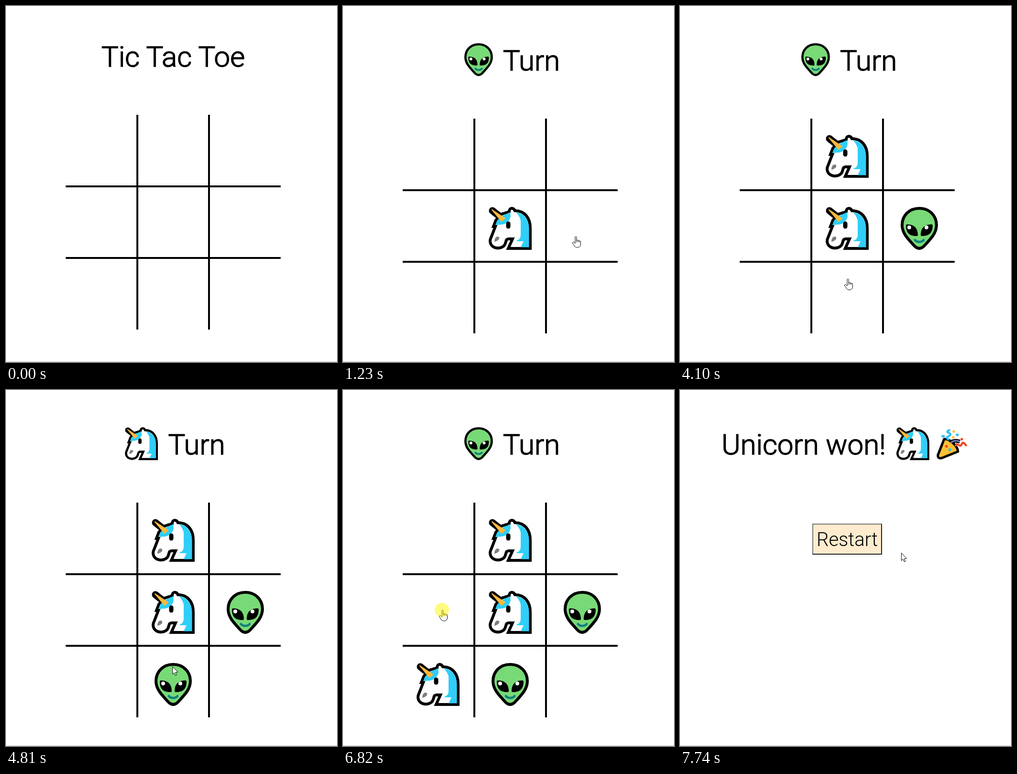
An HTML page for the animation above (8 s loop, 693 px wide and 746 px high).

```html
<!DOCTYPE html>
<html lang="en">
<head>
<meta charset="utf-8">
<title>Tic Tac Toe</title>
<style>
  html, body { margin: 0; width: 100%; height: 100%; overflow: hidden; background: #fff; }
  svg { display: block; }
  text { font: 300 60px Roboto, sans-serif; }
  .title { stroke: #000; stroke-width: 1.4; }
  .label { font-size: 40px; }
</style>
</head>
<body>
<svg width="693" height="746" viewBox="0 0 693 746">
  <defs>
    <g id="unicorn">
      <path d="M8 8 28 24" stroke="#000" stroke-width="15" stroke-linecap="round"/>
      <path d="M43 10C43 1 52 1 55 8C76 8 87 24 87 44V87H41L50 67H42C36 67 37 71 35 76C31 91 3 90 3 71C3 68 4 66 5 64L14 41H10L15 28L27 15Z"
        fill="#fff" stroke="#000" stroke-width="6"/>
      <path d="M57 11C75 13 84.500 28 84.500 45V84.500H67L73 72H57C64 68 67 66 67 58V28Q64 18 57 11Z" fill="#30cef8"/>
      <path d="M45 11 46 20C43 31 36 36 27 37L14 38 18 28 30 18Z" fill="#30cef8"/>
      <path d="M7 6 34 24 27 30Z" fill="#fbb93c" stroke="#fbb93c" stroke-width="2" stroke-linejoin="round"/>
      <rect x="36.500" y="30.500" width="9" height="15" rx="4.500"/>
      <path d="M12 73C12 66 15 62 19 62C25 63 23 71 12 73Z" fill="#7c8083"/>
    </g>
    <g id="alien">
      <path d="M39 3C60 3 75 18 75 38C75 54 65 65 48 83Q39 91 30 83C13 65 3 54 3 38C3 18 18 3 39 3Z"
        fill="#78da76" stroke="#000" stroke-width="6"/>
      <path id="eye" d="M11 39Q11 36 14 36.500C28 37 36 44 36 59Q36 61 33 61C18 61 11 54 11 39Z"/>
      <use href="#eye" transform="matrix(-1 0 0 1 78 0)"/>
      <g fill="#fff"><circle cx="18" cy="43" r="4"/><circle cx="54" cy="43" r="4"/></g>
      <path d="M30 69.500C34 74.500 44 74.500 48 69.500" fill="none" stroke="#138080" stroke-width="5" stroke-linecap="round"/>
    </g>
    <g id="popper" fill="none">
      <g stroke="#000" stroke-width="11" stroke-linecap="round" stroke-linejoin="round">
        <use href="#cyan"/><use href="#red"/><use href="#dots"/>
      </g>
      <path d="M17 25 4 58Q3 66 11 65L46 51C46 40 28 23 17 25Z" fill="#fdbf35" stroke="#000" stroke-width="5" stroke-linejoin="round"/>
      <path d="M31 33Q36 26 50 30" stroke="#000" stroke-width="8"/>
      <path d="M31 33Q36 26 50 30" stroke="#6f7bb5" stroke-width="3.500"/>
      <path id="cyan" d="M28 6Q20 9 27 12T26 19 28 26" stroke="#30bff0" stroke-width="4"/>
      <path id="red" d="M41 40Q42 33 47 37T54 35 63 38" stroke="#f04a24" stroke-width="4"/>
      <g id="dots">
        <path d="M14 19h2M44 16h1" stroke="#30bff0" stroke-width="5" stroke-linecap="round"/>
        <path d="M37 9h.1M36 21h.1" stroke="#fdbf35" stroke-width="5" stroke-linecap="round"/>
        <path d="M54 25h.1" stroke="#f04a24" stroke-width="5" stroke-linecap="round"/>
      </g>
      <circle cx="22" cy="40" r="3" fill="#f04a24"/><circle cx="29" cy="47" r="3" fill="#30bff0"/>
    </g>
    <g id="hand" stroke="#000">
      <path d="M0 12V1.500Q0 0 1.500 0T3 1.500V8Q4.500 6 6 8.500Q8 7 9 9.500Q11.500 8.500 11.500 11.500V16Q11 23 4.500 23Q-.5 23-2 18.500L-5.500 14Q-5.500 10.500-2.500 12L0 14.500Z" fill="#fff"/>
      <path d="M3 8V12M6 8.500V12M9 9.500V12"/>
    </g>
    <path id="arrow" d="M.5.500V16.500L4 13.500 6.500 19 9 18 6.500 12.500 11.500 12Z" fill="#fff" stroke="#000"/>
  </defs>
  <path d="M0 745.500H693" stroke="#c8c8c8"/>
  <g id="scene"></g>
</svg>
<script>
const LOOP = 8000, STEP = 75, START = 150;
const scene = document.getElementById('scene');
const small = 69 / 90;

// pointer key points: start time, number of steps, end x, end y
const moves = [
  [START, 1, 437, 572], [226, 3, 393, 522], [607, 3, 393, 491],
  [990, 4, 486, 483], [2100, 4, 348, 291], [3020, 9, 263, 298],
  [3870, 4, 350, 572], [4177, 2, 378, 603], [4810, 5, 159, 470],
  [5740, 1, 194, 548], [5817, 2, 207, 601],
  [6130, 6, 217, 502], [6590, 3, 207, 461], [7050, 7, 463, 341]
];

function pointer(t) {
  let x = 0, y = 0;
  for (const [start, steps, toX, toY] of moves) {
    if (t < start) break;
    const p = Math.min(1, (Math.floor((t - start) / STEP) + 1) / steps);
    const e = p * p * (3 - 2 * p);
    x += (toX - x) * e;
    y += (toY - y) * e;
  }
  return [x, y];
}

const cellAt = ([x, y]) => [Math.floor((x - 125) / 150), Math.floor((y - 236) / 150)];

// each press claims the cell under the pointer; the players alternate
const clicks = [455, 1480, 2560, 4420, 5970, 6820, 7590].map((press, i) => {
  const [col, row] = cellAt(pointer(press));
  return { press, land: press + STEP * (i < 5 ? 1 : 2), col, row, who: i % 2 ? 'alien' : 'unicorn' };
});
const win = clicks[clicks.length - 1].land;

const use = (id, x, y, scale = 1) =>
  `<use href="#${id}" transform="translate(${x} ${y}) scale(${scale})"/>`;
const text = (str, x, y, cls = 'title', anchor = 'start') =>
  `<text class="${cls}" x="${x}" y="${y}" text-anchor="${anchor}">${str}</text>`;

function board(placed) {
  const y = placed.length ? 236 : 228;
  const lines = `<path d="M275 ${y}v450M425 ${y}v450M125 ${y + 150}h450M125 ${y + 300}h450" stroke="#000" stroke-width="4"/>`;
  return lines + placed.map(({ who, col, row }) =>
    use(who, (who === 'alien' ? 160 : 154) + col * 151, 270 + row * 151)).join('');
}

function header(count) {
  if (!count) return text('Tic Tac Toe', 350, 127, 'title', 'middle');
  return count % 2
    ? use('alien', 254, 78, small) + text('Turn', 335, 135)
    : use('unicorn', 249, 78, small) + text('Turn', 339.5, 135);
}

function ending() {
  return text('Unicorn won!', 87, 135) + use('unicorn', 453, 78, small) + use('popper', 536, 78) +
    '<path d="M277 280h146v65h-146z" fill="#212121"/><path d="M277 345V280H423L421 282H279V343Z" fill="#767676"/>' +
    '<path d="M279 282h142v61h-142z" fill="#ffebcd"/>' + text('Restart', 286, 327, 'label');
}

function draw(t) {
  const [x, y] = pointer(t);
  if (t >= win) return ending() + use('arrow', x, y);
  const placed = clicks.filter(c => t >= c.land);
  let out = header(placed.length) + board(placed);
  if (t < START) return out;
  const [col, row] = cellAt([x, y]);
  const taken = placed.some(c => c.col === col && c.row === row);
  out += taken ? use('arrow', x - 7, y - 10) : use('hand', x, y);
  if (clicks.some(c => t >= c.press && t < c.land))
    out += `<circle cx="${x}" cy="${y}" r="15" fill="#fff700" opacity=".5"/>`;
  return out;
}

let last = '';
function frame(now) {
  const html = draw(now % LOOP);
  if (html !== last) scene.innerHTML = last = html;
  requestAnimationFrame(frame);
}
requestAnimationFrame(frame);
</script>
</body>
</html>
```
